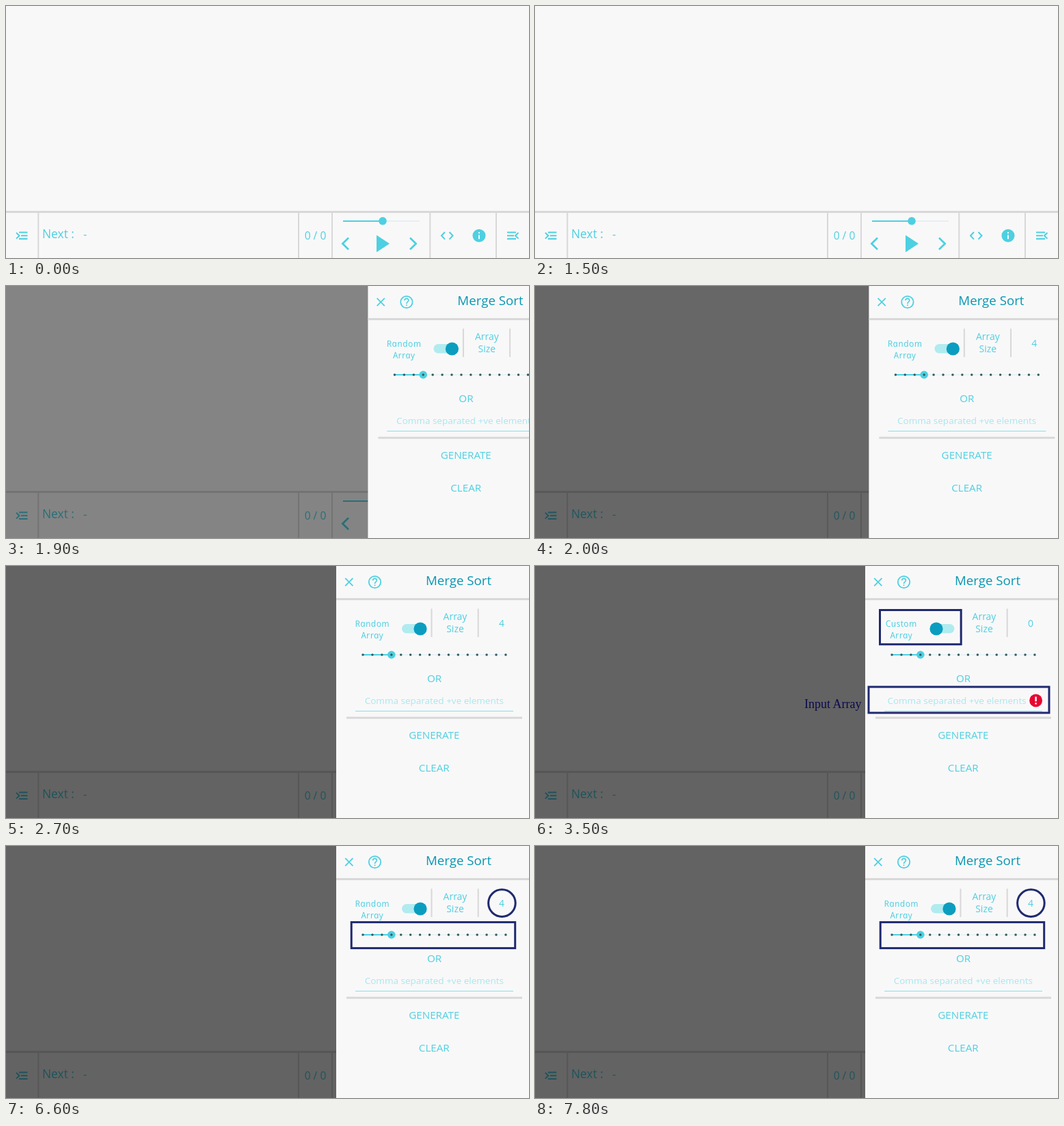
Write an HTML page that moves like this. It is 765 px wide and 369 px high and loops after 8000 ms.

```html
<!DOCTYPE html>
<html lang="en">
<head>
<meta charset="utf-8">
<title>Merge Sort panel</title>
<style>
  html, body { margin: 0; width: 100%; height: 100%; overflow: hidden; background: #f9f8f9; }
  svg { display: block; width: 765px; height: 369px; font-family: "Open Sans", "Noto Sans", sans-serif; }
  .ink { fill: #4dd0e1; }
  .line { fill: none; stroke: #4dd0e1; stroke-width: 2; }
  .rule { fill: none; stroke: #d8d8d8; stroke-width: 2; }
  .thick { stroke-width: 3; }
  .mark { fill: none; stroke: #1f2a6f; stroke-width: 3; }
  .mid { text-anchor: middle; }
  .bold { font-weight: 500; }
  .hand { font-size: 13px; font-style: italic; font-weight: 400; letter-spacing: .4px; }
</style>
</head>
<body>
<svg viewBox="0 0 765 369">
  <rect width="765" height="369" fill="#f9f8f9"/>

  <!-- player bar -->
  <path class="rule thick" d="M0 301.5H765"/>
  <path class="rule" d="M47.3 303V369M428 303V369M477 303V369M620.3 303V369M717 303V369"/>
  <path class="line" d="M15 332L19.5 336.3L15 340.6M19 331.5H31.5M22 336.3H31.5M19 341H31.5"/>
  <path class="line" d="M749.5 332L745 336.3L749.5 340.6M733 331.5H746M733 336.3H743M733 341H746"/>
  <text class="ink bold" x="53" y="340" font-size="17.4">Next :</text>
  <text class="ink" x="113" y="340" font-size="17">-</text>
  <text class="ink mid" x="452.5" y="342" font-size="15.6">0 / 0</text>
  <path d="M551 315H605" stroke="#e4f0f3" stroke-width="2"/>
  <path class="line" d="M493 315H551"/>
  <circle class="ink" cx="551" cy="314.8" r="5.8"/>
  <path class="line" stroke-width="2.6" d="M501 339.5L492.3 348L501 356.5M591 339.5L599.7 348L591 356.5" style="stroke-width:2.7"/>
  <path class="ink" d="M542 335.5L561 348L542 360.5Z"/>
  <path class="line" d="M642 331L637 336.3L642 341.6M648.5 331L653.5 336.3L648.5 341.6"/>
  <circle class="ink" cx="692" cy="336.3" r="9.5"/>
  <path d="M692 331V333.2M692 335.2V341.2" stroke="#f9f8f9" stroke-width="2"/>

  <text id="caption" x="394" y="208" font-size="18" fill="#1a1ac4" font-family="'Liberation Serif', serif">Input Array</text>
  <rect id="shade" width="765" height="369"/>

  <g id="panel">
    <rect x="483" width="283" height="369" fill="#f9f8f9"/>
    <path class="line" d="M496.2 17.9L507.4 29.1M507.4 17.9L496.2 29.1" style="stroke-width:1.8"/>
    <circle class="line" cx="539.5" cy="23.5" r="8.7" style="stroke-width:1.8"/>
    <path class="line" d="M536.6 21.3C536.6 17.4 542.4 17.4 542.4 21.1C542.4 23.2 539.5 23.2 539.5 25.9M539.5 27.2V29" style="stroke-width:1.7"/>
    <text class="mid bold" x="662" y="28" font-size="18.7" fill="#0797b2">Merge Sort</text>
    <path class="rule thick" d="M483 48.5H765"/>

    <g class="ink mid hand">
      <text id="kind" transform="translate(536.5 88.5) skewX(12)"></text>
      <text transform="translate(536.5 105.5) skewX(12)">Array</text>
    </g>
    <circle id="ripple" cx="606" cy="92" r="17.5"/>
    <rect x="579" y="85" width="34.5" height="13.5" rx="6.75" fill="#b0ebf0"/>
    <circle id="knob" cy="92" r="9.6" fill="#0b9dbf"/>
    <path class="rule" d="M622.5 62.5V104M690.7 62.5V104"/>
    <g class="ink mid bold" font-size="14">
      <text x="657" y="79">Array</text>
      <text x="657" y="97">Size</text>
    </g>
    <text id="size" class="ink mid" x="725" y="88.5" font-size="14"></text>

    <path d="M522 130H731" stroke="#e4f0f3" stroke-width="1.5"/>
    <path class="line" d="M522 130H564"/>
    <circle class="ink" cx="563.8" cy="130" r="5.8"/>
    <g id="ticks" fill="#335a5f"></g>

    <g class="ink mid" font-size="15.2">
      <text class="bold" x="626.5" y="169.5">OR</text>
      <text x="626.3" y="253">GENERATE</text>
      <text x="626.3" y="300.5">CLEAR</text>
    </g>
    <text id="hint" class="mid" y="202" font-size="13.5" fill="#a6e7ee">Comma separated +ve elements</text>
    <path d="M511 212.5H742" stroke="#86dfe9"/>
    <path class="rule thick" d="M498 222.3H755"/>
    <g id="alert">
      <circle cx="732.6" cy="197" r="9.4" fill="#e8052f"/>
      <path d="M732.6 191.5V198.2M732.6 200.2V202.5" stroke="#fff" stroke-width="2.4"/>
    </g>

    <rect id="markSwitch" class="mark" x="504.5" y="64.5" width="118.7" height="50.2"/>
    <rect id="markInput" class="mark" x="488" y="177" width="264" height="38"/>
    <g id="markSize">
      <rect class="mark" x="505.2" y="111.6" width="239.5" height="38"/>
      <circle class="mark" cx="725.4" cy="83.6" r="19.8"/>
    </g>
  </g>
</svg>
<script>
  const LOOP = 8000, STEP = 100, WIDTH = 282;
  const el = id => document.getElementById(id);
  const clamp = v => Math.min(1, Math.max(0, v));
  const show = (id, on) => el(id).setAttribute("visibility", on ? "inherit" : "hidden");

  el("ticks").innerHTML = Array.from({ length: 16 }, (_, i) =>
    `<circle cx="${522 + i * 13.93}" cy="130" r="1.75"/>`).join("");

  function draw(t) {
    // drawer slides in, easing out, while the page darkens
    const left = (1 - clamp((t - 1717) / 356)) ** 2.5;
    el("panel").setAttribute("transform", `translate(${left * WIDTH} 0)`);
    show("panel", left < 1);
    el("shade").setAttribute("opacity", 0.6 * (1 - left) ** 1.34);

    // switch: random -> custom -> random
    const off = clamp((t - 3150) / 150) - clamp((t - 4250) / 150);
    const custom = t >= 3200 && t < 4300;
    el("knob").setAttribute("cx", 606 - 19 * off);
    el("kind").textContent = custom ? "Custom" : "Random";
    el("size").textContent = custom ? 0 : 4;
    el("hint").setAttribute("x", custom ? 617 : 626.3);
    show("caption", custom);
    show("alert", custom);
    el("ripple").setAttribute("opacity", t < 4300 ? 0 : 0.1 * clamp((4800 - t) / 200));

    show("markSwitch", t >= 3200 && t < 5200);
    show("markInput", t >= 3200 && t < 3800);
    show("markSize", t >= 6600);
  }

  const start = performance.now();
  function frame() {
    const t = (performance.now() - start) % LOOP;
    draw(Math.floor(t / STEP) * STEP);
    requestAnimationFrame(frame);
  }
  frame();
</script>
</body>
</html>
```
